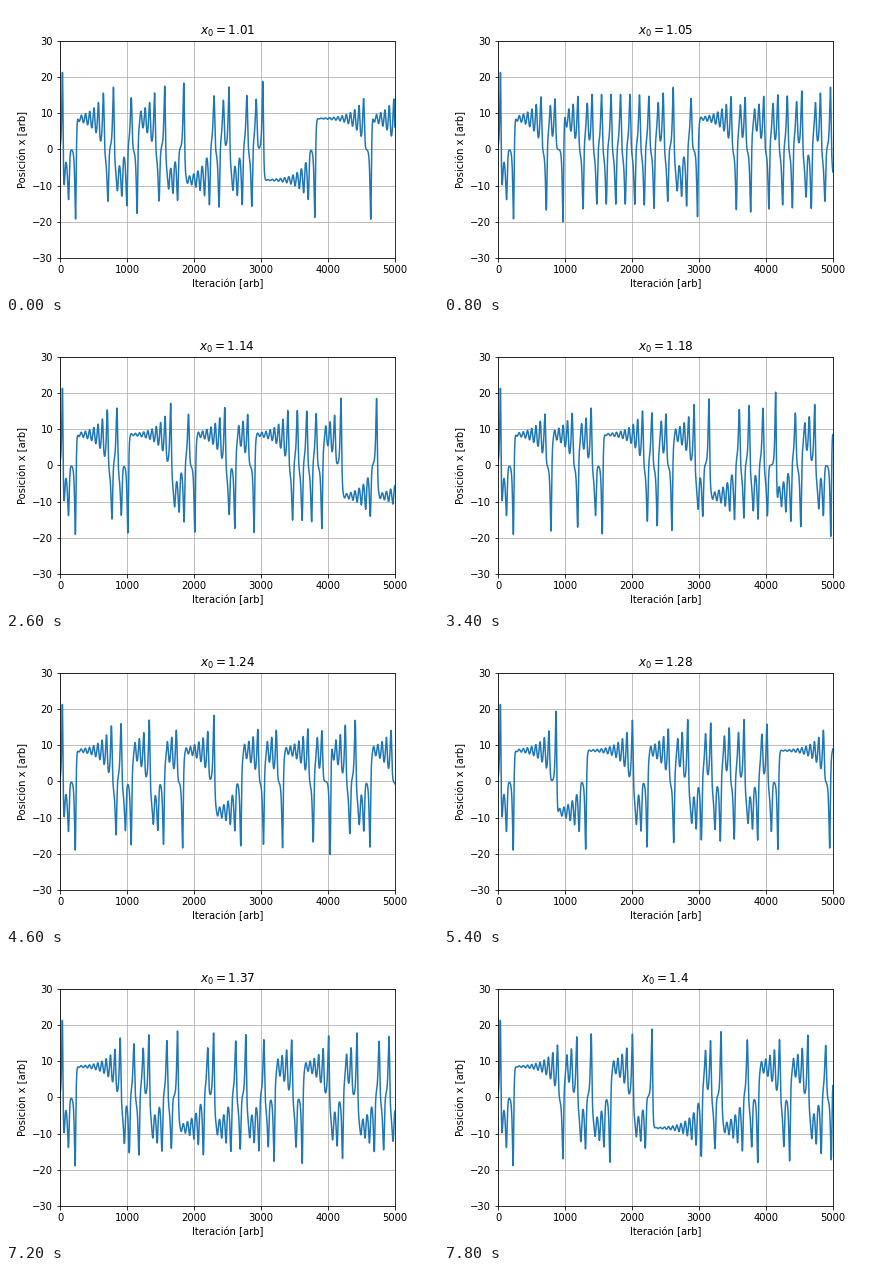
A matplotlib script that plays this animation: 432x288 px, repeating every 8 s.

```python
import numpy as np
import matplotlib.pyplot as plt
from matplotlib.animation import FuncAnimation

FRAMES, INTERVAL = 40, 200
STEPS, DT = 5000, 0.01
SIGMA, RHO, BETA = 10, 28, 8 / 3

# Start values: a part of a sweep from 1 to 2 in 100 points.
STARTS = np.linspace(1, 2, 100)[1:FRAMES + 1]


def lorenz(x, y, z):
    return SIGMA * (y - x), x * (RHO - z) - y, x * y - BETA * z


def euler(x0):
    """x at every step of the Lorenz system, for all starts at once."""
    x, y, z = x0, np.ones_like(x0), np.ones_like(x0)
    path = [x]
    for _ in range(STEPS):
        dx, dy, dz = lorenz(x, y, z)
        x, y, z = x + dx * DT, y + dy * DT, z + dz * DT
        path.append(x)
    return np.array(path)


paths = euler(STARTS)

fig, ax = plt.subplots(figsize=(6, 4), dpi=72)
fig.subplots_adjust(left=0.125, right=0.9, bottom=0.125, top=0.88)
line, = ax.plot(paths[:, 0])
ax.set_xlim(0, STEPS)
ax.set_ylim(-30, 30)
ax.set_xlabel("Iteración [arb]")
ax.set_ylabel("Posición x [arb]")
ax.grid()
title = ax.set_title("")


def update(i):
    line.set_ydata(paths[:, i])
    title.set_text(f"$x_0 = {round(float(STARTS[i]), 2)}$")
    return line, title


anim = FuncAnimation(fig, update, frames=FRAMES, interval=INTERVAL,
                     repeat=True, repeat_delay=0)
plt.show()
```
